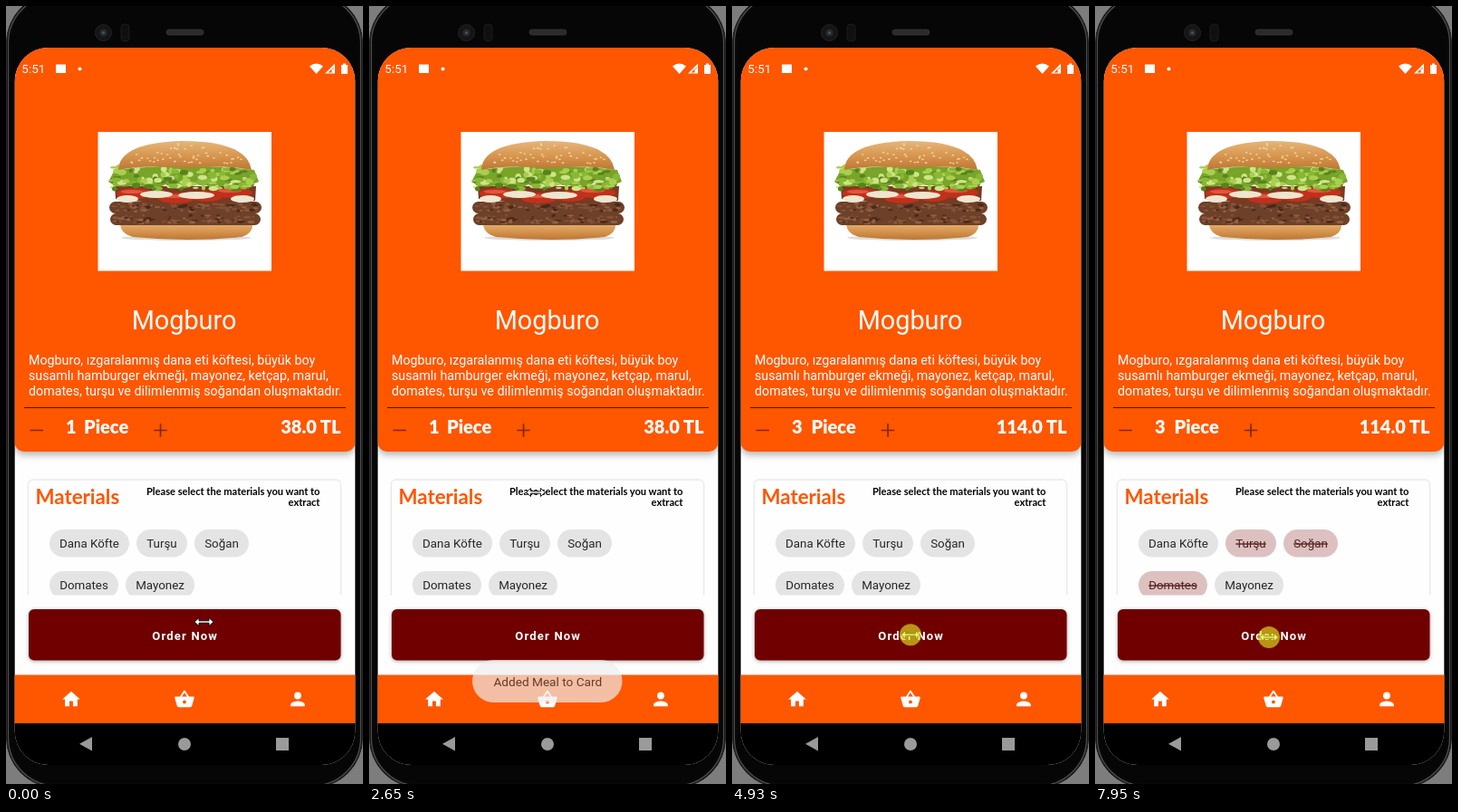
An HTML page that plays this animation: 394 by 859 pixels, repeating every 8000 ms.

```html
<!DOCTYPE html>
<html lang="tr">
<head>
<meta charset="utf-8">
<title>Meal detail</title>
<style>
  html, body { margin: 0; width: 100%; height: 100%; overflow: hidden; background: #7d7d7d; }
  svg { display: block; width: 100%; height: 100%; }
  text { font-family: Roboto, sans-serif; white-space: pre; }
  .head { font-family: Lato, sans-serif; font-weight: 700; }
  .heavy { font-weight: 900; }
  .chip text { font-size: 13.35px; fill: #262626; }
  .chip rect { fill: #e4e4e4; }
  .chip.off rect { fill: #ddc1c1; }
  .chip.off text { fill: #562020; text-decoration: line-through; }
  .lift { filter: drop-shadow(0 1.5px 2px #0005); }
  .panel { filter: drop-shadow(0 3px 4px #0005); }
</style>
</head>
<body>
<svg viewBox="0 0 394 859" preserveAspectRatio="none">
  <defs>
    <clipPath id="screen"><rect x="9.700" y="46" width="375.600" height="792" rx="37"/></clipPath>
    <clipPath id="list"><rect x="10" y="510" width="375" height="140.500"/></clipPath>
    <clipPath id="buttonShape"><rect x="25" y="666" width="344.500" height="56.500" rx="6"/></clipPath>
    <linearGradient id="bun" x2="0" y2="1">
      <stop stop-color="#e6b67a"/><stop offset=".55" stop-color="#d6944d"/><stop offset="1" stop-color="#bd7633"/>
    </linearGradient>
  </defs>

  <!-- phone body -->
  <rect x=".5" y="-14" width="393" height="877" rx="55" fill="#080808" stroke="#2a2a2a"/>
  <rect x="2.500" y="-12" width="389" height="873" rx="53" fill="none" stroke="#4f4f4f" stroke-width="1.300"/>
  <rect x="5.500" y="-9" width="383" height="867" rx="50" fill="#060606"/>
  <circle cx="107.500" cy="29.500" r="9" fill="#151515" stroke="#222"/>
  <circle cx="107.500" cy="29.500" r="4" fill="#252a31"/>
  <circle cx="107.500" cy="29.500" r="1.600" fill="#4b5259"/>
  <rect x="127" y="20" width="9" height="19" rx="4" fill="#101010" stroke="#1c1c1c"/>
  <rect x="177" y="26" width="41" height="6" rx="3" fill="#2b2b2b" stroke="#3a3a3a" stroke-width=".7"/>

  <g clip-path="url(#screen)">
    <rect x="9" y="46" width="377" height="792" fill="#fefefe"/>
    <rect class="panel" x="9.700" y="0" width="375.600" height="492" rx="10" fill="#ff5600"/>

    <!-- status bar -->
    <g fill="#fff">
      <text x="17.300" y="74.300" font-size="13.500">5:51</text>
      <rect x="55" y="64.500" width="11" height="9.500"/>
      <circle cx="81.500" cy="69.500" r="2"/>
      <path d="M335 66.500q7.500-6 15 0l-7.500 8.500z"/>
      <path d="M363 63.500v11h-11zM361.500 67.500l-6 6h4v-4h2z" fill-rule="evenodd"/>
      <path d="M370 65h2v-1.500h3v1.500h2v10h-7z"/>
    </g>

    <rect x="101.500" y="139" width="191.500" height="153.500" fill="#fff"/>
    <g id="burger"></g>

    <g fill="#fff">
      <text x="196.500" y="357" font-size="28.800" text-anchor="middle">Mogburo</text>
      <g font-size="14.270">
        <text x="25" y="396">Mogburo, ızgaralanmış dana eti köftesi, büyük boy</text>
        <text x="25" y="412.800">susamlı hamburger ekmeği, mayonez, ketçap, marul,</text>
        <text x="25" y="429.600">domates, turşu ve dilimlenmiş soğandan oluşmaktadır.</text>
      </g>
      <g font-size="20">
        <text class="head heavy" id="count" x="66" y="472"></text>
        <text class="head heavy" id="piece" y="472">Piece</text>
        <text class="head heavy" id="price" x="369.500" y="472" text-anchor="end"></text>
      </g>
    </g>
    <path d="M20 443.500H375" stroke="#471800"/>
    <g stroke="#7c2b06" stroke-width="1.700">
      <path d="M26.500 468.500h14.500"/>
      <path id="plus" d="M163.300 468.500h14.500M170.550 461.200v14.500"/>
    </g>

    <!-- materials -->
    <g clip-path="url(#list)">
      <rect x="25" y="523.500" width="344" height="170" rx="5" fill="#fefefe" style="filter:drop-shadow(0 .5px 1.300px #0004)"/>
      <text class="head" x="32.500" y="550" font-size="22.300" fill="#ff5600">Materials</text>
      <g font-size="11.100" text-anchor="end">
        <text class="head" x="346.500" y="540">Please select the materials you want to</text>
        <text class="head" x="346.500" y="552">extract</text>
      </g>
      <g id="chips"></g>
    </g>

    <!-- order button -->
    <rect class="lift" x="25" y="666" width="344.500" height="56.500" rx="6" fill="#700000"/>
    <g clip-path="url(#buttonShape)"><circle id="ripple" cx="197" cy="697" fill="#fff"/></g>
    <text x="197.700" y="699.700" font-size="13" font-weight="700" letter-spacing="1.200" text-anchor="middle" fill="#fff">Order Now</text>

    <!-- navigation -->
    <rect x="9" y="738.500" width="377" height="54" fill="#ff5600"/>
    <g fill="#fff">
      <path transform="translate(60.200 753.700) scale(.98)" d="M10 20v-6h4v6h5v-8h3L12 3 2 12h3v8z"/>
      <path transform="translate(185.200 753.700) scale(.98)" d="M17.200 9l-4.400-6.600q-.8-.9-1.600 0L6.800 9H2q-1 0-1 1.300l2.600 9.200Q4 21 5.500 21h13q1.500 0 1.900-1.500l2.600-9.200Q23 9 22 9zM9 9l3-4.400L15 9zM12 17a2 2 0 1 1 0-4 2 2 0 0 1 0 4z" fill-rule="evenodd"/>
      <path transform="translate(310.200 753.700) scale(.98)" d="M12 12a4 4 0 1 0 0-8 4 4 0 0 0 0 8zm0 2c-2.700 0-8 1.300-8 4v2h16v-2c0-2.700-5.300-4-8-4z"/>
    </g>
    <rect x="9" y="792" width="377" height="46" fill="#000"/>
    <path d="M95 807v15.500l-14-7.750zM298 808h14v14h-14zM190 815a7 7 0 1 0 14 0a7 7 0 1 0-14 0z" fill="#9a9a9a"/>

    <g id="toast">
      <rect x="114" y="722" width="165.500" height="47" rx="23.500" fill="#eee" fill-opacity=".93"/>
      <text x="197.300" y="750.700" font-size="13.650" text-anchor="middle" fill="#333">Added Meal to Card</text>
    </g>
  </g>

  <g id="cursor">
    <path d="M-10.500 0l5-4.500v3.300h11v-3.300l5 4.500-5 4.500v-3.300h-11v3.300z" fill="#fff" stroke="#000" stroke-width=".9"/>
    <circle id="press" r="12" fill="#e0e020" opacity=".66"/>
  </g>
</svg>

<script>
const LOOP = 8000;
const $ = id => document.getElementById(id);
const clamp = v => Math.max(0, Math.min(1, v));
const progress = (t, from, to) => clamp((t - from) / (to - from));
const ease = p => p * p * (3 - 2 * p);

function drawBurger() {
  let seed = 7;
  const random = () => (seed = seed * 16807 % 2147483647) / 2147483647;
  const between = (a, b) => a + random() * (b - a);
  const pick = list => list[Math.floor(random() * list.length)];
  const shape = (d, fill) => `<path d="${d}" fill="${fill}"/>`;
  const blob = (x, y, rx, ry, fill) => `<ellipse cx="${x}" cy="${y}" rx="${rx}" ry="${ry}" fill="${fill}"/>`;
  const scatter = (n, make) => Array.from({ length: n }, make).join('');

  const bottom = shape('M126 238H272Q274 251 260 255Q200 261 140 255Q125 251 126 238z', 'url(#bun)');
  const patty = (y, w) =>
    `<rect x="${198 - w / 2}" y="${y}" width="${w}" height="13" rx="6.5" fill="#6d4029"/>` +
    scatter(80, () => blob(198 + between(-.47, .47) * w, y + between(2, 11), between(1, 4), between(.7, 1.6),
      pick(['#946041', '#4a281a', '#835138'])));
  const filling = shape('M120 199H276L275 215Q200 223 121 213z', '#7a3a20') +
    [[142, 207, 20], [188, 212, 20], [222, 210, 17], [250, 206, 22]]
      .map(([x, y, r]) => blob(x, y, r, 6, '#c2301b') + blob(x - 3, y - 2, r * .6, 2, '#e0573f')).join('') +
    [[166, 208, 18], [210, 209, 20], [261, 213, 13], [134, 213, 12]]
      .map(([x, y, r]) => blob(x, y, r, 4, '#efe6cf')).join('');
  const lettuce = shape('M120 181Q198 172 274 181L279 194Q262 202 249 195Q232 205 214 195Q192 207 176 197Q158 207 146 196Q126 204 113 194z', '#78a42a') +
    scatter(120, () => blob(between(118, 275), between(178, 202), between(2, 6), between(1, 3.5),
      pick(['#a9cf4e', '#57821c', '#cfe488', '#88b835'])));
  const top = shape('M124 181Q125 151 194 149Q266 149 271 181Q240 175 198 179Q150 175 124 181z', 'url(#bun)');
  const seeds = scatter(48, () => {
    const angle = between(Math.PI, 2 * Math.PI), r = Math.sqrt(random());
    return blob(197 + Math.cos(angle) * 64 * r, 174 + Math.sin(angle) * 22 * r, 1.4, .8, '#f2d6a4');
  });
  $('burger').innerHTML = blob(199, 256, 72, 3, '#ddd') + bottom + patty(229, 166) + patty(216, 168) +
    filling + lettuce + top + seeds;
}

// label, x, y, width, time of removal
const chips = [
  ['Dana Köfte', 48, 578, 88, Infinity],
  ['Turşu', 144, 578, 56, 5930],
  ['Soğan', 208, 578, 60, 6480],
  ['Domates', 48, 624, 76, 7180],
  ['Mayonez', 132, 624, 76, Infinity],
];

// time, x, y of the pointer
const path = [
  [70, 218.5, 680], [400, 167, 606], [760, 202, 699], [900, 206, 700], [1500, 143, 448], [1600, 146, 452],
  [1670, 160, 523], [2000, 200, 697], [2250, 200, 697], [2650, 184, 537], [3020, 170, 466], [4030, 170, 466],
  [4300, 185, 607], [4760, 197, 692], [5080, 197, 696], [5550, 179, 597], [6000, 179, 597], [6300, 238, 596],
  [6600, 238, 596], [6990, 88.5, 641], [7450, 88.5, 641], [7820, 192, 697], [LOOP, 192, 697],
];
const presses = [[2060, 2200], [3290, 3410], [3950, 4030], [4880, 5010], [5810, 5930], [6370, 6490], [7060, 7190], [7870, LOOP]];
const orders = [2180, 4990];
// fade-in start and end, fade-out start and end
const toasts = [[2330, 2760, 4450, 4740], [5020, 5450, 7230, 7600]];

function pointerAt(t) {
  const i = path.findIndex(p => p[0] >= t);
  if (i < 1) return path[0].slice(1);
  const [t0, x0, y0] = path[i - 1], [t1, x1, y1] = path[i];
  const k = ease(progress(t, t0, t1));
  return [x0 + (x1 - x0) * k, y0 + (y1 - y0) * k];
}

function render(t) {
  const count = t < 3410 ? 1 : t < 4020 ? 2 : 3;
  $('count').textContent = count;
  $('price').textContent = `${(38 * count).toFixed(1)} TL`;
  const shift = count > 1 ? 1.5 : 0;
  $('piece').setAttribute('x', 86 + shift);
  $('plus').setAttribute('transform', `translate(${shift})`);

  chips.forEach((chip, i) => $('chips').children[i].classList.toggle('off', t >= chip[4]));

  const order = orders.find(start => t >= start && t < start + 420);
  const spread = order ? (t - order) / 420 : 1;
  $('ripple').setAttribute('r', 30 + 170 * Math.sqrt(spread));
  $('ripple').setAttribute('opacity', .2 * (1 - spread));

  $('toast').setAttribute('opacity', Math.max(...toasts.map(([a, b, c, d]) =>
    progress(t, a, b) * (1 - progress(t, c, d)))));

  $('cursor').setAttribute('transform', `translate(${pointerAt(t)})`);
  $('press').setAttribute('visibility', presses.some(([a, b]) => t >= a && t < b) ? 'visible' : 'hidden');
}

drawBurger();
$('chips').innerHTML = chips.map(([label, x, y, w]) =>
  `<g class="chip"><rect x="${x}" y="${y}" width="${w}" height="30.5" rx="15.25"/>` +
  `<text x="${x + w / 2}" y="${y + 20}" text-anchor="middle">${label}</text></g>`).join('');

const start = performance.now();
function frame() {
  render((performance.now() - start) % LOOP);
  requestAnimationFrame(frame);
}
frame();
</script>
</body>
</html>
```
